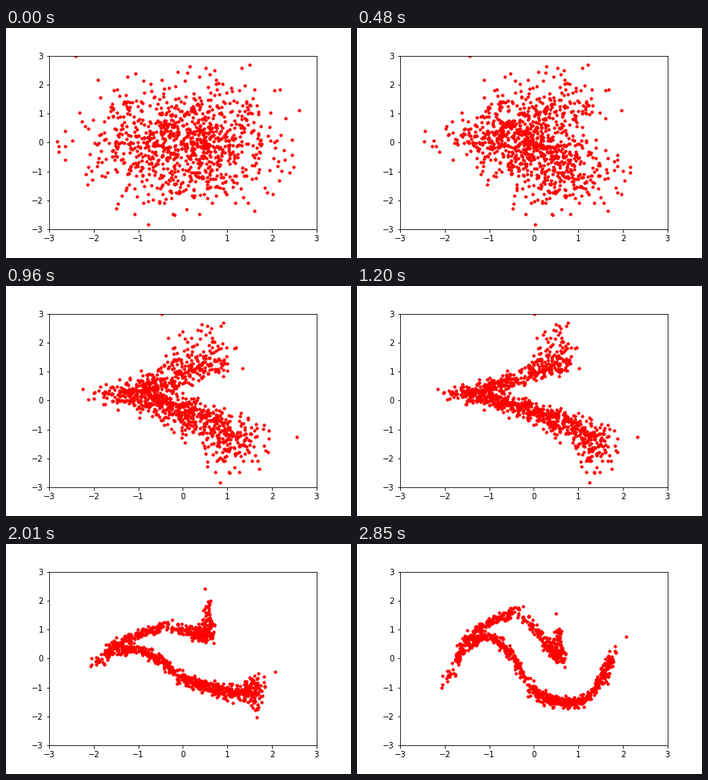
Recreate the animation shown at these times as a matplotlib script. Size 432 px wide and 288 px high, loop 2.88 s.

```python
import numpy as np
import matplotlib.pyplot as plt
from matplotlib.animation import FuncAnimation

COUNT = 1000
STEPS = 48      # frames per coupling layer
INTERVAL = 30   # ms
STRAYS = [(-2.4, 3.0), (1.5, 2.69), (3.55, -1.27), (-.78, -2.83)]


def sample():
    """Standard normal cloud plus a few far strays."""
    z = np.random.default_rng(11).standard_normal((COUNT, 2))
    return np.vstack([z[np.hypot(*z.T) < 2.9], STRAYS])


def step_at(v, centre, slope):
    return np.tanh((v - centre) * slope)


def couple_x(p):
    """Scale and shift x as a function of y: a wedge with its tip at y = 0.2."""
    x, y = p.T
    scale = .02 + .22 / (1 + ((y + .2) / 1.5) ** 4)
    d = np.abs(y - .2)
    upper = .56 - 2.2 * np.exp(-(d / .63) ** 2)
    lower = 1.69 - 3.3 * np.exp(-d * (.9 + .48 * d))
    return np.column_stack([x * scale + np.where(y > .2, upper, lower), y])


def couple_y(p):
    """Scale and shift y as a function of x: bends the wedge into two moons."""
    x, y = p.T
    scale = (.55 + 1.3 * np.exp(-((x + .25) / .6) ** 2)
             + 1.2 * (1 - step_at(x, -1.65, 2.5)))
    shift = (-.5 + 1.82 * step_at(x, -1.8, 2.1)
             - 1.1 * step_at(x, -.25, 1.67)
             + 1.375 * step_at(x, 1.52, 2.86))
    return np.column_stack([x, y * scale + shift])


start = sample()
middle = couple_x(start)
stages = [start, middle, couple_y(middle)]

plt.rcParams["font.family"] = "DejaVu Sans"
fig, ax = plt.subplots(figsize=(6, 4), dpi=72)
fig.subplots_adjust(left=.125, right=.9, bottom=.125, top=.88)
ax.set(xlim=(-3, 3), ylim=(-3, 3), xticks=range(-3, 4), yticks=range(-3, 4))
dots = ax.scatter(*start.T, s=10, color="red")


def draw(i):
    layer, step = divmod(i, STEPS)
    t = step / STEPS
    dots.set_offsets((1 - t) * stages[layer] + t * stages[layer + 1])
    return (dots,)


anim = FuncAnimation(fig, draw, frames=2 * STEPS, interval=INTERVAL,
                     repeat=True, repeat_delay=0, blit=False)
plt.show()
```
